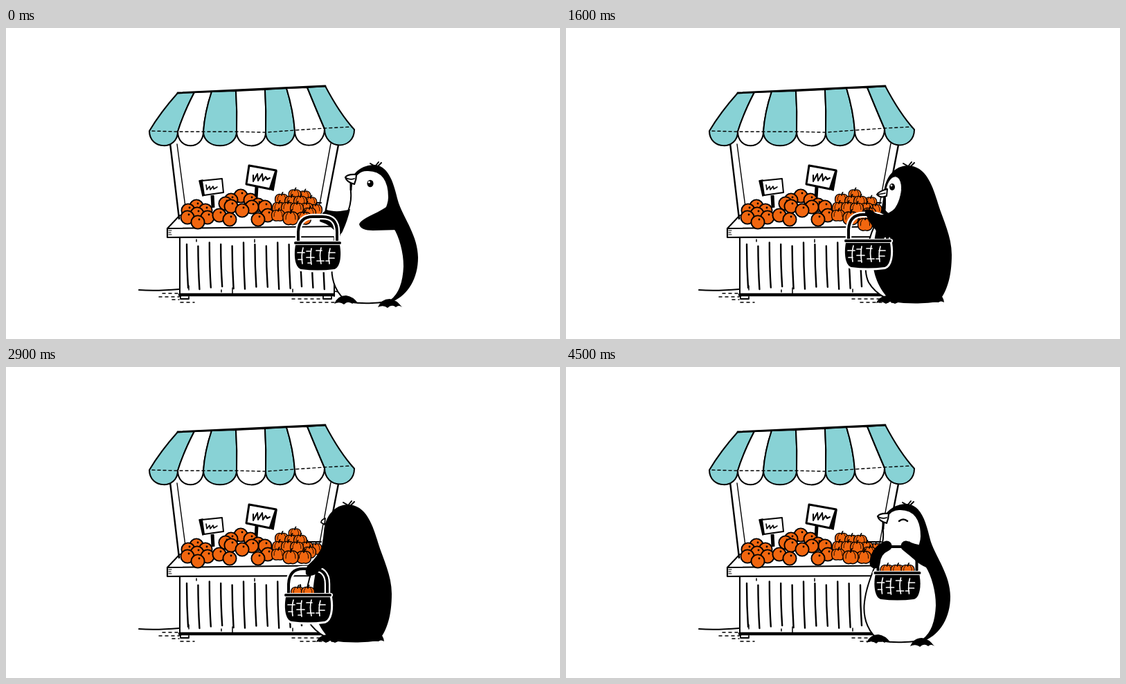
An HTML page that plays this animation: 800x450 px, repeating every 5 s.

```html
<!DOCTYPE html>
<html lang="en">
<head>
<meta charset="utf-8">
<title>Penguin at the market</title>
<style>
  html, body { margin: 0; width: 100%; height: 100%; overflow: hidden; background: #fff; }
  svg { display: block; width: 100%; height: 100%; }
</style>
</head>
<body>
<svg id="stage" viewBox="0 0 800 450" stroke-linecap="round" stroke-linejoin="round">
  <g id="stall"></g>
  <g id="scene"></g>
</svg>
<script>
const TEAL = '#88d2d5', ORANGE = '#f1660f';

const line = (d, width = 2, color = '#000', extra = '') =>
  `<path d="${d}" fill="none" stroke="${color}" stroke-width="${width}" ${extra}/>`;
const shape = (d, fill = '#000', width = 0) =>
  `<path d="${d}" fill="${fill}" stroke="#000" stroke-width="${width}"/>`;
const group = (x, y, content, scale = 1) =>
  `<g transform="translate(${x} ${y}) scale(${scale})">${content}</g>`;

const orange = ([x, y]) => group(x, y,
  `<circle r="9.6" fill="${ORANGE}" stroke="#000" stroke-width="1.9"/><circle cx="2" cy="-4" r="1.4"/>`);
const pumpkin = ([x, y, scale = 0.85]) => group(x, y,
  shape('M0-8C-6-11-12-6-11 1C-11 8-5 11 0 9C5 11 11 8 11 1C12-6 6-11 0-8Z', ORANGE, 1.5) +
  line('M-4-8Q-8-3-7 2M4-8Q8-3 7 2', 1) + line('M0-7Q0-10 2-12', 2), scale);

// ---- Stall ----
const ORANGES = [
  [275, 258], [263, 264], [288, 264], [276, 269], [262, 274], [291, 274], [277, 281],
  [339, 243], [325, 249], [353, 249], [317, 254], [364, 256], [374, 259], [325, 258], [355, 259],
  [341, 264], [308, 271], [378, 271], [323, 277], [364, 277]
];
const PICKS = [[431, 243, .8], [440, 252, .8], [417, 241, .8]];
const PUMPKINS = [
  [398, 248], [412, 251], [425, 251], [447, 263], [394, 260], [434, 261], [407, 260], [420, 261],
  [438, 268], [393, 271], [430, 275, .95], [411, 275, 1]
];

function awning() {
  const top = [[248, 94], [272, 93], [297, 92], [332, 91], [374, 89], [405, 87], [435, 86], [461, 84]];
  const hem = [[207, 149], [248, 150], [285, 150], [333, 150], [375, 151], [417, 149], [460, 146], [503, 147]];
  const bend = [[223, 122], [256, 124], [287, 122], [334, 121], [376, 120], [415, 120], [448, 118], [482, 124]];
  let out = '';
  for (let i = 0; i < 7; i++) {
    const [x1, y1] = hem[i], [x2, y2] = hem[i + 1];
    out += shape(`M${top[i]}Q${bend[i]} ${x1} ${y1}C${x1} 177 ${x2} 177 ${x2} ${y2}` +
      `Q${bend[i + 1]} ${top[i + 1]}Z`, i % 2 ? '#fff' : TEAL, 2);
  }
  return out + line('M248 94L461 84', 2.8) +
    line('M211 149L248 150 333 150 375 151 416 148 460 145 499 143', 1.4, '#000', 'stroke-dasharray="4 4"');
}

function slats() {
  let out = '';
  for (let i = 0; i < 13; i++) {
    const x = 261 + i * 16.4, y = 313 + 3 * Math.sin(i * 2.1);
    out += `M${x} ${y}Q${x} 345 ${x + 2} ${376 + 2 * Math.sin(i * 1.7)}`;
  }
  return line(out, 2.4) + line('M275 306V309M359 306V310M264 373V379M311 379V382M414 378V382M327 376V385', 1.5);
}

const signs =
  line('M298 242L299 260', 5, '#000', 'stroke-linecap="butt"') +
  shape('M279 221L284 243 288 241 284 220Z', '#000', 1.5) +
  shape('M283 221L312 218 314 238 286 242Z', '#fff', 2) +
  line('M289 227L290 234 294 229 295 234 299 229 300 233 305 230', 1.6) +
  line('M362 230L361 246', 5, '#000', 'stroke-linecap="butt"') +
  shape('M386 205L391 207 386 235 381 233Z', '#000', 1.5) +
  shape('M351 199L390 206 381 233 347 226Z', '#fff', 3) +
  line('M357 213L357 222 363 211 364 221 370 211 371 221 375 215 377 219 381 217', 2);

const ground =
  line('M192 379Q215 381 250 378', 2) +
  line('M226 384H250M221 389H250M240 393H250M252 397H272M413 392H458M425 397H475', 1.5, '#000', 'stroke-dasharray="4 5"') +
  line('M475 381L492 384', 1.5);

document.getElementById('stall').innerHTML =
  line('M237 167L250 276M480 169L461 268', 2.4) + line('M247 168L260 266M469 167L452 260', 1.4) +
  awning() +
  line('M432 253H455', 2) + line('M251 271L233 290', 2) +
  shape('M233 290L486 287V302L233 303Z', '#fff', 2.2) +
  line('M235 293H239M235 296H238M235 299H239', 1.2) +
  line('M251 303V388M474 303V388', 2) + slats() +
  line('M251 386H473', 4.5) + line('M252 388V392H264V389M458 388V392H470V389', 1.8) +
  ground + signs + ORANGES.map(orange).join('');

// ---- Basket, origin at the middle of its rim ----
const HANDLE = 'M-28-2V-16Q-27-38-7-38H7Q28-38 28-16V-2';
const BOWL = 'M-32 3C-35 20-32 36-24 38Q0 41 24 38C32 36 35 20 32 3Z';
const WEAVE = 'M-21 7Q-24 18-22 30M-9 8Q-11 18-9 31M5 7Q2 18 5 30M18 8Q15 18 17 30' +
  'M-29 14H-19M-28 24H-22M-16 12H-10M-16 21H-5M-14 29H-10M-2 11H6M-1 26H9M12 26H17M16 14H25M16 22H24';

function basket(x, y, count) {
  const fruit = [-15, 0, 15].slice(0, count).map(px => pumpkin([px, -4])).join('');
  return group(x, y,
    line(HANDLE, 8.5, '#fff') + line(HANDLE, 4) + fruit +
    line(BOWL + 'M-33 0H33', 6, '#fff') + shape(BOWL) + line('M-32 0H32', 4) + line(WEAVE, 1.7, '#fff'));
}

// ---- Penguin ----
const tuft = x => line(`M${x} 200L${x - 7} 196M${x + 1} 199L${x + 5} 194M${x + 4} 200L${x + 9} 195`, 2);
const foot = (x, y) => group(x, y, shape('M-17 6Q-12-6 0-6Q10-5 18 6Q13 2 9 6Q3 1-3 7Q-9 2-17 6Z'));

function frontBody(smiling) {
  const eye = smiling
    ? line('M521 223Q527 218 533 223', 2.5)
    : '<ellipse cx="526" cy="225" rx="4.6" ry="5.3"/><circle cx="524.3" cy="223" r="1.6" fill="#fff"/>';
  return shape('M497 222C503 205 518 198 533 198C554 201 560 226 566 250C572 272 595 300 595 332C595 362 581 386 558 396L520 300Z') +
    shape('M498 238C497 226 504 206 521 206C544 205 553 222 553 245C553 255 549 262 546 268L560 288' +
      'C569 302 575 325 575 345C574 370 568 385 556 394C545 398 515 400 495 396C478 388 468 365 471 340' +
      'C474 312 489 285 495 262Q499 250 498 238Z', '#fff', 2) +
    line('M498 224V234', 3) +
    shape('M506 212Q493 211 490 216Q492 223 503 226Q506 219 506 212Z', '#fff', 2.2) + line('M491 217Q497 220 503 218', 1.8) +
    eye + tuft(533) + foot(491, 393) + foot(554, 398);
}

function reachPose() {
  return frontBody(false) +
    shape('M556 253C545 266 513 274 510 284Q512 293 530 293L567 292Z') +
    shape('M497 262C485 266 472 266 463 263Q452 270 453 280Q470 285 478 298Q484 301 487 292Q493 279 497 262Z') +
    basket(450, 311, 0);
}

function frontPose({ lift, carried, smiling }) {
  const u = lift / 22, mix = (a, b) => a + (b - a) * u;
  return frontBody(smiling) + basket(518.5, 320 - lift, carried) +
    line(`M${mix(488, 486)} ${mix(269, 284)}Q${mix(487, 487)} ${mix(281, 266)} ${mix(496, 503)} ${mix(285, 259)}`, 15) +
    shape(`M554 ${mix(254, 258)}Q540 ${mix(268, 256)} 535 ${mix(276, 252)}L532 ${mix(291, 266)}Q546 286 566 292Z`) +
    line(`M553 277L${mix(529, 531)} ${mix(283, 259)}`, 15);
}

function marketPose({ look, lift, carried, fallY }) {
  const body =
    shape('M446 285C434 310 428 350 437 368Q445 382 462 391L475 391 470 300Z', '#fff', 2) +
    shape('M459 238C461 215 475 199 494 199C518 200 528 224 536 250C543 275 557 300 557 328C557 360 550 382 538 396' +
      'Q505 401 470 396C455 382 443 360 443 335C443 312 448 290 455 264Q458 250 459 238Z') +
    tuft(494) +
    shape('M448 398Q452 388 464 387L482 396 475 399 468 396 462 399 456 396Z') +
    shape('M520 396L538 384Q545 388 546 397Q541 394 538 397Z');
  const face = look
    ? shape('M463 229C466 219 472 214 477 215C485 218 486 232 483 243C480 256 474 264 467 270L461 264Q462 250 461 241Z', '#fff', 1) +
      shape('M464 233Q452 236 449 241Q455 247 463 243Z', '#fff', 2) + line('M450 241L461 239', 1.4) +
      '<ellipse cx="471" cy="230" rx="4" ry="5"/><circle cx="470" cy="228" r="1.4" fill="#fff"/>'
    : shape('M461 219Q455 221 455 225L460 228Z', '#fff', 1.8);
  const rise = 22 - lift;
  const arm = look
    ? shape(`M474 262C462 272 452 ${273 + rise} 442 ${264 + rise}Q431 ${259 + rise} 432 ${268 + rise}` +
      `Q440 ${285 + rise / 2} 447 ${292 + rise / 2}L452 303H475Z`)
    : shape('M459 255Q449 276 439 284Q431 290 433 300Q438 304 447 300Q458 292 466 275Z');
  return body + face + (fallY ? pumpkin([432, fallY, .95]) : '') +
    basket(436, 330 - lift, carried) + arm;
}

// ---- Timeline: each entry holds until the next one ----
const still = { dx: 0, lift: 0, carried: 0, picked: 0 };
const steps = [];
const at = (time, pose, changes = {}) => steps.push({ ...still, ...changes, time, pose });

at(0, reachPose);
at(100, frontPose);
at(600, frontPose, { dx: -19.5 });
at(700, frontPose, { dx: -40 });
at(800, marketPose, { look: true });
at(900, marketPose);
for (let n = 0; n < 3; n++) {
  const start = 1400 + n * 1000, before = { look: true, carried: n, picked: n + 1, lift: 22 };
  at(start, marketPose, { ...before, picked: n, lift: 11 });
  at(start + 100, marketPose, { ...before, fallY: 275 });
  at(start + 200, marketPose, { ...before, fallY: 284 });
  at(start + 300, marketPose, { ...before, carried: n + 1 });
  at(start + 400, marketPose, { ...before, carried: n + 1, lift: 11 });
  if (n < 2) at(start + 500, marketPose, { carried: n + 1, picked: n + 1 });
}
const full = { dx: -40, carried: 3, picked: 3 };
at(3900, frontPose, full);
at(4400, frontPose, { ...full, lift: 11, smiling: true });
at(4500, frontPose, { ...full, lift: 22, smiling: true });

const scene = document.getElementById('scene');
let shown;
function draw() {
  const time = performance.now() % 5000;
  const step = steps.findLast(s => s.time <= time);
  if (step !== shown) {
    shown = step;
    const pile = PICKS.filter((_, i) => i >= step.picked).concat(PUMPKINS);
    scene.innerHTML = pile.map(pumpkin).join('') + group(step.dx, 0, step.pose(step));
  }
  requestAnimationFrame(draw);
}
draw();
</script>
</body>
</html>
```
